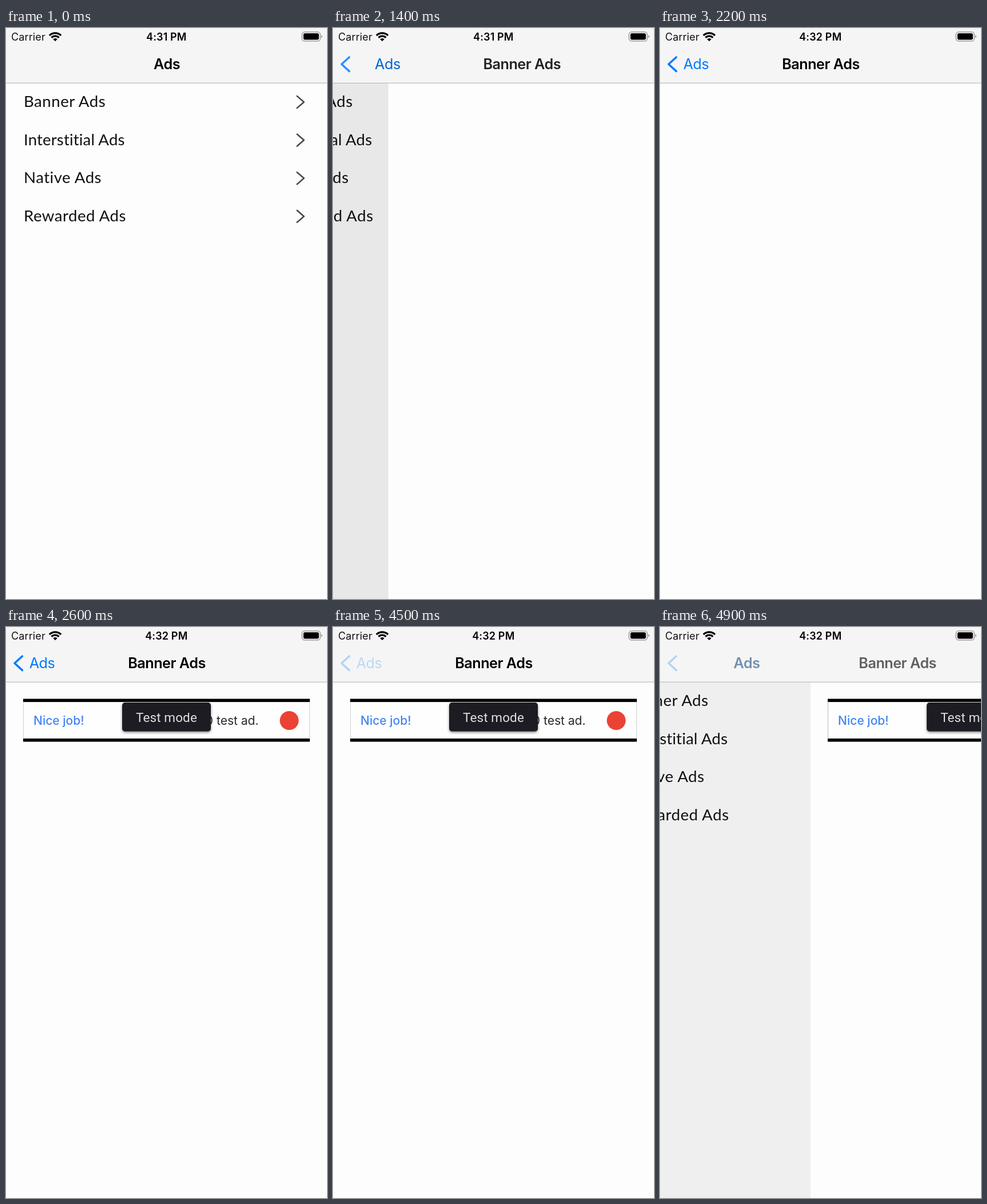
An HTML page for the animation above (5000 ms loop, 561x998 px).

```html
<!DOCTYPE html>
<html lang="en">
<head>
<meta charset="utf-8">
<title>Banner ads demo</title>
<style>
html, body { margin: 0; width: 100%; height: 100%; overflow: hidden; background: #fdfdfd; }
svg { display: block; width: 100vw; height: 100vh; }
text { font-family: Inter, "Liberation Sans", sans-serif; }
.row { font: 27.6px Lato, "Open Sans", sans-serif; letter-spacing: .5px; fill: #111; }
.head { font-size: 25.2px; letter-spacing: -.5px; text-anchor: middle; }
.status { font-size: 18px; letter-spacing: .15px; }
.badge { font: 22.5px Roboto, "Noto Sans", sans-serif; letter-spacing: .1px; }
.line { fill: none; stroke-linecap: round; stroke-linejoin: round; }
</style>
</head>
<body>
<svg viewBox="0 0 561 998" preserveAspectRatio="none">
  <defs>
    <filter id="soft" x="-10%" y="-20%" width="120%" height="150%">
      <feDropShadow dx="0" dy="2" stdDeviation="2" flood-opacity=".45"/>
    </filter>
  </defs>

  <g id="list"><rect width="561" height="998" fill="#fdfdfd"/></g>
  <rect id="dim" width="561" height="998"/>

  <g id="page">
    <rect width="561" height="998" fill="#fdfdfd"/>
    <g id="ad">
      <rect x="30" y="125.5" width="501" height="75"/>
      <rect x="30" y="131" width="501" height="64" fill="#cfcfd2"/>
      <rect x="31" y="131.5" width="499" height="63" fill="#fefefe"/>
      <text x="48" y="171" font-size="21" font-weight="500" fill="#4285f4">Nice job!</text>
      <text x="441.5" y="171" font-size="21" text-anchor="end" fill="#26282b">468x60 test ad.</text>
      <circle cx="495" cy="163.5" r="16.5" fill="#ea4335"/>
      <rect x="203" y="132" width="155" height="50.5" rx="5" fill="#1c1f23" filter="url(#soft)"/>
      <text class="badge" x="280.5" y="165.5" text-anchor="middle" fill="#dedfe1">Test mode</text>
    </g>
  </g>

  <rect width="561" height="96" fill="#f5f5f5"/>
  <rect y="95.7" width="561" height="1.2" fill="#bcbcbc"/>
  <text class="status" x="9" y="21.7" fill="#111">Carrier</text>
  <g id="wifi" class="line" transform="translate(86 23.2)"></g>
  <rect x="517.3" y="6.8" width="32" height="16" rx="4.6" fill="none" stroke="#8f8f8f" stroke-width="1.3"/>
  <rect x="519.8" y="9.2" width="27" height="11.2" rx="2.6"/>
  <path d="M551 12.3q1.8 .8 1.8 2.6t-1.8 2.6z" fill="#8f8f8f"/>
  <text class="status" id="clock" x="280.3" y="21.7" font-weight="600" text-anchor="middle"></text>

  <path id="arrow" class="line" d="M28.5 51 15 63.3 28.5 75.6" stroke="#007aff" stroke-width="3.5"/>
  <text class="head" id="back" y="72">Ads</text>
  <text class="head" id="title" y="72" font-weight="600">Banner Ads</text>
</svg>
<script>
const W = 561, LOOP = 5000, STEP = 100;
const $ = id => document.getElementById(id);
const set = (id, attrs) => {
  for (const k in attrs) $(id).setAttribute(k, attrs[k]);
};
const mix = (a, b, k) => `rgb(${a.map((v, i) => Math.round(v + (b[i] - v) * k))})`;

// critically damped spring, 0 to 1
const spring = (ms, rate) => {
  const u = Math.max(0, ms) / 1000 * rate;
  return 1 - (1 + u) * Math.exp(-u);
};

["Banner", "Interstitial", "Native", "Rewarded"].forEach((name, i) => {
  const y = 138 + i * 66.6;
  const tight = name.length > 9 ? ' style="letter-spacing:.15px"' : "";
  $("list").insertAdjacentHTML("beforeend",
    `<text class="row" x="31" y="${y}"${tight}>${name} Ads</text>
     <path class="line" d="M508.7 ${y - 19}l12 10.4-12 10.4" stroke="#4a4a4a" stroke-width="2.6"/>`);
});

const arc = r => {
  const d = r * Math.SQRT1_2;
  return `M${-d} ${-d}A${r} ${r} 0 0 1 ${d} ${-d}`;
};
$("wifi").innerHTML = [14.3, 9.1].map(r =>
  `<path d="${arc(r)}" stroke="#000" stroke-width="3.2" stroke-linecap="butt"/>`).join("")
  + `<path d="${arc(5.3)}L0 0z" fill="#000"/>`;

function draw(t) {
  const pressed = t >= 4500;
  const p = pressed ? 1 - spring(t - 4649, 6.3) : spring(t - 1172, 14);
  const q = 1 - p;

  set("list", { transform: `translate(${-0.3 * W * p} 0)` });
  set("dim", { opacity: 0.1 * p });
  set("page", { transform: `translate(${W * q} 0)` });
  set("ad", { visibility: t >= 2500 ? "visible" : "hidden" });

  set("arrow", { opacity: pressed ? 0.27 : p });
  set("back", {
    x: 63 + 188 * q + 30 * q ** 6,
    "font-weight": q > 0.3 ? 600 : 400,
    fill: pressed
      ? mix([188, 216, 246], [20, 50, 90], q ** 1.1)
      : mix([0, 122, 255], [0, 0, 0], q)
  });
  set("title", { x: 281 + 286 * q, opacity: p ** 0.8 });
  $("clock").textContent = t >= 2000 || p === 0 && pressed ? "4:32 PM" : "4:31 PM";
}

const start = performance.now();
function tick() {
  const t = (performance.now() - start) % LOOP;
  draw(Math.floor(t / STEP) * STEP);
  requestAnimationFrame(tick);
}
tick();
</script>
</body>
</html>
```
